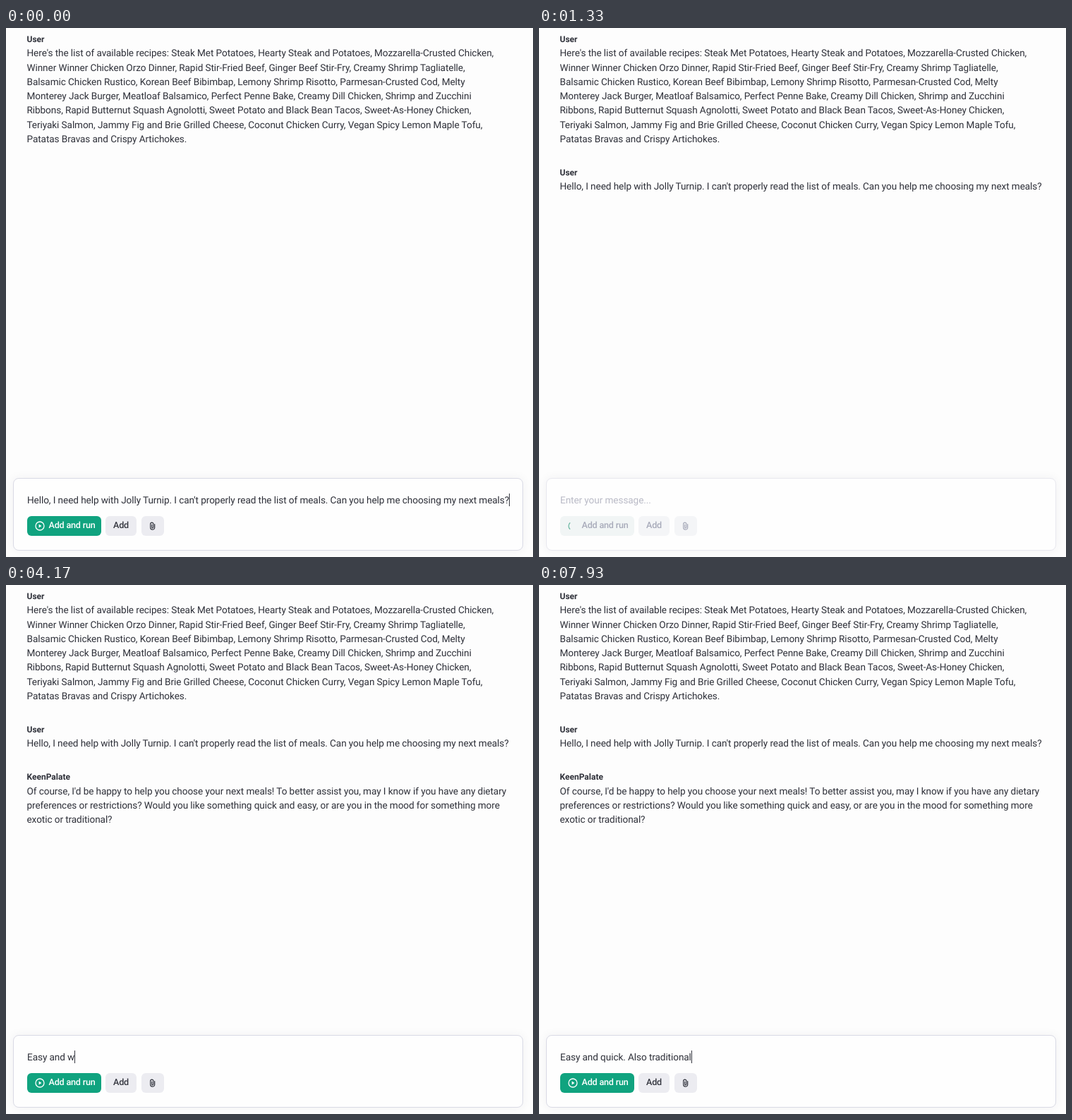
An HTML page that plays this animation: 747 px wide and 750 px high, repeating every 8000 ms.

```html
<!DOCTYPE html>
<html lang="en">
<head>
<meta charset="utf-8">
<title>Recipe chat</title>
<style>
  html, body { margin: 0; width: 100%; height: 100%; overflow: hidden; background: #fdfdfd; }
  #stage {
    position: relative; width: 747px; height: 750px; overflow: hidden; color: #2e3039;
    font: 400 13.6px/20.25px Roboto, "Liberation Sans", sans-serif;
    letter-spacing: -.085px; text-rendering: geometricPrecision;
  }
  .turn { position: absolute; left: 29.5px; white-space: pre; }
  .turn b { display: block; font-size: 12px; line-height: 20.25px; letter-spacing: 0; }
  #panel {
    position: absolute; left: 10px; top: 638px; width: 721px; height: 101px;
    border: 1px solid; border-radius: 8px; background: #fefefe;
    box-shadow: 0 0 14px rgba(52, 53, 75, .06);
  }
  #field { position: absolute; left: 30px; top: 660px; height: 20px; line-height: 20px; white-space: pre; }
  #caret {
    display: inline-block; width: 1px; height: 18px; margin-right: -1px;
    vertical-align: -4px; background: #353740;
  }
  #hint { color: #b9bac6; }
  .btn {
    position: absolute; top: 692px; height: 28px; border-radius: 6px; white-space: nowrap;
    font-weight: 500; font-size: 12.6px; line-height: 28px; letter-spacing: -.2px;
  }
  .btn svg { position: absolute; fill: none; stroke: currentColor; stroke-linecap: round; stroke-linejoin: round; }
  #run { left: 30px; width: 105px; }
  #run span { position: absolute; left: 30.5px; top: 0; }
  #run svg { left: 10px; top: 6px; stroke-width: 1.3; }
  #add { left: 141px; width: 44px; text-align: center; }
  #clip { left: 192px; width: 32px; }
  #clip svg { left: 10px; top: 7px; stroke-width: 1.2; }
</style>
</head>
<body>
<div id="stage">
  <div class="turn" style="top:6px"><b>User</b>Here's the list of available recipes: Steak Met Potatoes, Hearty Steak and Potatoes, Mozzarella-Crusted Chicken,
Winner Winner Chicken Orzo Dinner, Rapid Stir-Fried Beef, Ginger Beef Stir-Fry, Creamy Shrimp Tagliatelle,
Balsamic Chicken Rustico, Korean Beef Bibimbap, Lemony Shrimp Risotto, Parmesan-Crusted Cod, Melty
Monterey Jack Burger, Meatloaf Balsamico, Perfect Penne Bake, Creamy Dill Chicken, Shrimp and Zucchini
Ribbons, Rapid Butternut Squash Agnolotti, Sweet Potato and Black Bean Tacos, Sweet-As-Honey Chicken,
Teriyaki Salmon, Jammy Fig and Brie Grilled Cheese, Coconut Chicken Curry, Vegan Spicy Lemon Maple Tofu,
Patatas Bravas and Crispy Artichokes.</div>
  <div class="turn" id="ask" style="top:194.7px"><b>User</b><span id="question"></span></div>
  <div class="turn" id="answer" style="top:262.3px"><b>KeenPalate</b><span id="reply"></span></div>
  <div id="panel"></div>
  <div id="field"><span id="typed"></span><span id="caret"></span><span id="hint">Enter your message...</span></div>
  <div class="btn" id="run">
    <svg width="16" height="16">
      <g id="play"><circle cx="8" cy="8" r="6"/><path d="M6.6 5.6 10.4 8 6.6 10.4Z" fill="currentColor" stroke="none"/></g>
      <path id="spinner" d="M8 2A6 6 0 0 1 14 8" stroke="#6fb9a4"/>
    </svg>
    <span>Add and run</span>
  </div>
  <div class="btn" id="add">Add</div>
  <div class="btn" id="clip">
    <svg width="12" height="14"><path d="M8.7 4.6V9.2A3 3 0 0 1 2.7 9.2V4.2A2 2 0 0 1 6.9 4.2V8.8A1.1 1.1 0 0 1 4.7 8.8V5"/></svg>
  </div>
</div>
<script>
const LOOP = 8000, SENT = 30, POSTED = 930, REPLY = 1770, DONE = 2450, FOCUS = 2830, TYPE = 3400;
const QUESTION = "Hello, I need help with Jolly Turnip. I can't properly read the list of meals. Can you help me choosing my next meals?";
const WORDS = `Of course, I'd be happy to help you choose your next meals! To better assist you, may I know if you have any dietary
preferences or restrictions? Would you like something quick and easy, or are you in the mood for something more
exotic or traditional?`.match(/\S+\s*/g);

// Bursts of typing: first key, last key, characters (\b deletes one).
const BURSTS = [
  [TYPE, 4170, "Easy and w"], [4270, 4270, "\b"], [4370, 4500, "qu"], [4670, 5000, "ick"],
  [5170, 5500, ". "], [5700, 6270, "Also"], [6500, 6570, " t"], [6770, 6770, "r"],
  [7000, 7000, "a"], [7200, 7930, "ditional"]
];

const el = id => document.getElementById(id);
const show = (id, on) => { el(id).style.visibility = on ? "visible" : "hidden"; };
const write = (id, text) => { if (el(id).textContent !== text) el(id).textContent = text; };
const ramp = (t, start, length) => Math.min(1, Math.max(0, (t - start) / length));
const mix = (a, b, k) => `rgb(${a.map((v, i) => Math.round(v + (b[i] - v) * k))})`;

const INK = [53, 55, 64], FAINT = [168, 171, 186], WHITE = [255, 255, 255];
const GREEN = [16, 163, 127], PALE = [241, 245, 245], GREY = [236, 236, 241], MIST = [244, 245, 247];

function paint(id, back, front) {
  el(id).style.background = back;
  el(id).style.color = front;
}

function typedAt(t) {
  if (t < SENT) return QUESTION;
  let text = "";
  for (const [start, end, chars] of BURSTS) {
    const gap = (end - start) / Math.max(1, chars.length - 1);
    [...chars].forEach((c, i) => {
      if (t + .01 >= start + i * gap) text = c === "\b" ? text.slice(0, -1) : text + c;
    });
  }
  return text;
}

function render(t) {
  const busy = t >= POSTED && t < DONE;
  const focused = t < POSTED || t >= FOCUS;
  const text = typedAt(t);

  show("ask", t >= POSTED);
  show("answer", t >= REPLY);
  const count = Math.ceil(ramp(t, REPLY, DONE - REPLY) * WORDS.length);
  write("reply", WORDS.slice(0, count).join(""));

  write("typed", text);
  el("hint").style.display = text ? "none" : "";
  show("caret", focused);
  el("panel").style.borderColor = focused ? "#d9dae5" : "#e8e8ef";

  const live = t < TYPE ? 1 - ramp(t, SENT, 200) : ramp(t, TYPE, 200);
  paint("run", mix(PALE, GREEN, live), mix(FAINT, WHITE, live));
  paint("add", mix(MIST, GREY, live), mix(FAINT, INK, live));
  const attach = t < DONE ? 1 - ramp(t, SENT, 200) : ramp(t, DONE, 100);
  paint("clip", mix(MIST, GREY, attach), mix(FAINT, INK, attach));

  show("play", !busy);
  show("spinner", busy);
  const angle = 225 + (t - 1330) * .36;
  el("spinner").setAttribute("transform", `rotate(${angle} 8 8)`);
}

function tick() {
  render(performance.now() % LOOP);
  requestAnimationFrame(tick);
}

write("question", QUESTION);
tick();
</script>
</body>
</html>
```
